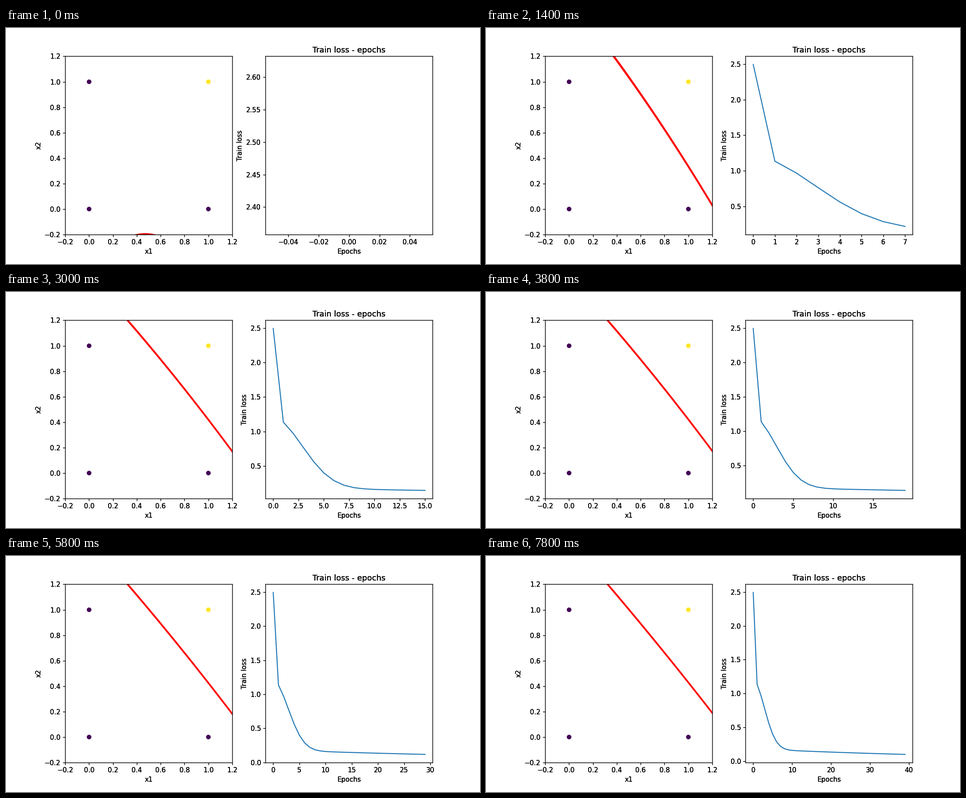
A matplotlib script that plays this animation: 1058x529 px, repeating every 8 s.

```python
import numpy as np
import matplotlib.pyplot as plt
from matplotlib.animation import FuncAnimation
from matplotlib.artist import Artist
from matplotlib.patches import Polygon

EPOCHS = 40
STEP_MS = 200

# Training loss: a sudden first drop, a bell-shaped descent and a slow tail.
epochs = np.arange(EPOCHS)
loss = (1.312 * 0.01 ** epochs
        + np.exp(-(epochs / 4.12) ** 2)
        + 0.183 * np.exp(-epochs / 64.6))

# The decision boundary is a parabola given by its heights at three x values
# and a half thickness; it moves between key poses as the loss falls.
NODES = [0, 0.6, 1.2]
KEY_EPOCHS = [39, 15, 7, 2, 0]
KEY_POSES = np.array([
    [1.549, 0.891, 0.190, 0.0108],
    [1.538, 0.892, 0.170, 0.0113],
    [1.655, 0.903, 0.030, 0.0140],
    [0.790, 0.300, -0.570, 0.0280],
    [-0.498, -0.241, -0.891, 0.0300],
])
grid = np.linspace(-0.2, 1.2, 200)


def band(epoch):
    """Outline of the boundary band at one epoch."""
    *heights, half = [np.interp(loss[epoch], loss[KEY_EPOCHS], column)
                      for column in KEY_POSES.T]
    mid = np.polyval(np.polyfit(NODES, heights, 2), grid)
    upper = np.column_stack([grid, mid + half])
    lower = np.column_stack([grid, mid - half])
    return np.vstack([upper, lower[::-1]])


class Overdraw(Artist):
    """Draws frames, ticks and text again, which darkens their soft edges."""

    def draw(self, renderer):
        for ax in self.figure.axes:
            for part in (ax.xaxis, ax.yaxis, ax.title, *ax.spines.values()):
                part.draw(renderer)


fig, (ax_data, ax_loss) = plt.subplots(1, 2, figsize=(10, 5), dpi=105.8)
fig.subplots_adjust(left=0.125, right=0.9, bottom=0.125, top=0.88, wspace=0.2)
for order in (5, 6):
    fig.add_artist(Overdraw()).set_zorder(order)

ax_data.scatter([0, 0, 1, 1], [0, 1, 0, 1], c=[0, 0, 0, 1], cmap="viridis")
boundary = ax_data.add_patch(Polygon(band(0), facecolor="red", edgecolor="none"))
ax_data.set(xlim=(-0.2, 1.2), ylim=(-0.2, 1.2), xlabel="x1", ylabel="x2")

curve, = ax_loss.plot([], [], color="tab:blue", lw=1.5)
ax_loss.set(title="Train loss - epochs", xlabel="Epochs", ylabel="Train loss")


def update(epoch):
    boundary.set_xy(band(epoch))
    curve.set_data(epochs[:epoch + 1], loss[:epoch + 1])
    ax_loss.relim()
    ax_loss.autoscale_view()
    return boundary, curve


anim = FuncAnimation(fig, update, frames=EPOCHS, interval=STEP_MS,
                     repeat=True, repeat_delay=0, blit=False)
plt.show()
```
